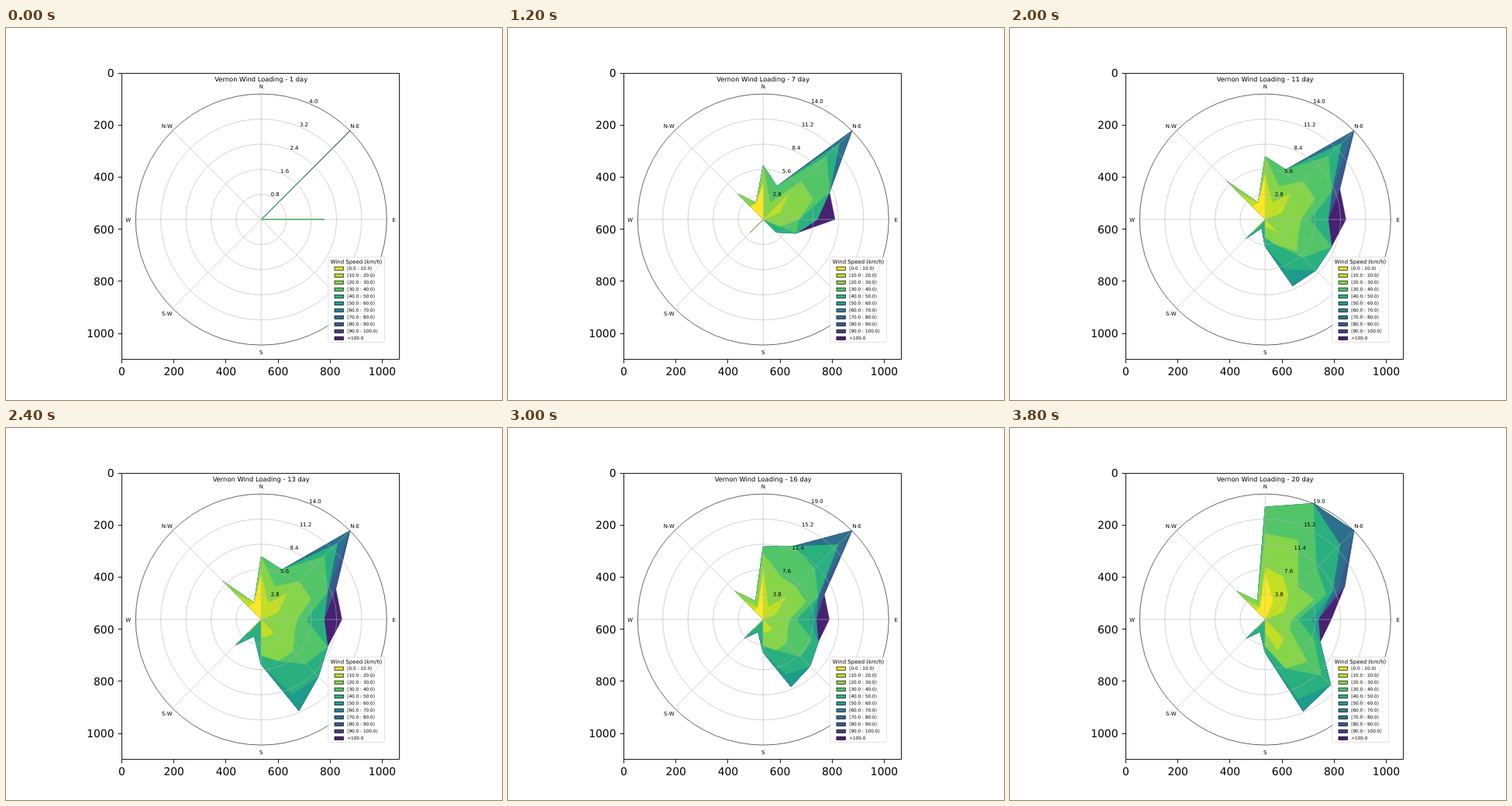
Recreate the animation shown at these times as an HTML page. Size 640 by 480 pixels, loop 4 s.

```html
<!DOCTYPE html>
<html lang="en">
<head>
<meta charset="utf-8">
<title>Vernon Wind Loading</title>
<style>
  html, body { margin: 0; width: 100%; height: 100%; overflow: hidden; background: #fff; }
  svg { display: block; width: 640px; height: 480px; }
  text { font-family: "DejaVu Sans", Verdana, sans-serif; font-size: 6.94px; text-rendering: geometricPrecision; }
  .axis text { font-size: 13.89px; }
  .axis path { fill: none; stroke: #000; stroke-width: .9; }
  .grid { fill: none; stroke: #b0b0b0; stroke-width: .56; }
  .rim { fill: none; stroke: #000; stroke-width: .6; }
  .mid { text-anchor: middle; }
  .end { text-anchor: end; }
  .title { font-size: 8.33px; text-anchor: middle; }
  .legend text { font-size: 5.78px; }
  .legend .head { font-size: 6.94px; text-anchor: middle; }
  polygon { stroke-width: .5; stroke-linejoin: bevel; }
</style>
</head>
<body>
<svg id="stage" viewBox="0 0 640 480"></svg>
<script>
const CX = 329.3, CY = 247.1, R = 162, DAYS = 20, STEP = 200;
const DIRS = ['N', 'NNE', 'NE', 'ENE', 'E', 'ESE', 'SE', 'SSE',
              'S', 'SSW', 'SW', 'WSW', 'W', 'WNW', 'NW', 'NNW'];
const COLORS = ['#fde725', '#c2df23', '#86d549', '#52c569', '#2ab07f', '#1e9b8a',
                '#25858e', '#2d708e', '#38598c', '#433e85', '#482173'];

// Readings gained up to each day: direction, then speed bin + count.
const LOG = {
  1: 'NE 4+2 7+2, E 2+2',
  4: 'N 0+2 2+2, NNE 2+2 3+2, NE 1+2 2+2 3+4, ENE 2+4, E 10+2, SE 4+2, NW 2+2',
  7: 'N 0+2, NE 1+2, ENE 1+2 3+2, E 2+2 4+2, ESE 2+2 3+2, SW 1+2, NW 0+2, NNW 0+2',
  9: 'NNE 1+2, ESE 2+2 3+2, SE 1+2 2+2, SSE 4+2 5+2, NW 1+2',
  13: 'N 0+1, ENE 8+1, E 3+1, SE 2+1 3+2, SSE 1+2 2+3 4+2, S 1+2 2+2 4+1, SSW 4+2, SW 4+2',
  16: 'N 0+2 1+1 3+1, NNE 2+3 3+3, NE 1+1 4+3 7+1, ENE 2+1, E 5+1, ESE 4+1, SE 3+1, NNW 2+1',
  20: 'N 2+3 3+3, NNE 0+3 1+2 2+1 3+1, ENE 1+1 4+1 7+1, SE 1+2 2+2, SSE 1+3 4+1'
};

const stage = document.getElementById('stage');

function add(parent, tag, attrs = {}, label) {
  const el = document.createElementNS('http://www.w3.org/2000/svg', tag);
  for (const key in attrs) el.setAttribute(key, attrs[key]);
  if (label !== undefined) el.textContent = label;
  return parent.appendChild(el);
}
const group = name => add(stage, 'g', { class: name });

function polar(r, deg) {
  const a = deg * Math.PI / 180;
  return [CX + r * Math.sin(a), CY - r * Math.cos(a)];
}

// Cumulative counts per speed bin and direction on a given day.
function totals(day) {
  const bins = COLORS.map(() => DIRS.map(() => 0));
  let prev = 0;
  for (const key of Object.keys(LOG).map(Number)) {
    const share = Math.min(1, Math.max(0, (day - prev) / (key - prev)));
    for (const entry of LOG[key].split(', ')) {
      const [dir, ...gains] = entry.split(' ');
      for (const gain of gains) {
        const [bin, count] = gain.split('+').map(Number);
        bins[bin][DIRS.indexOf(dir)] += Math.round(count * share);
      }
    }
    prev = key;
  }
  for (let b = 1; b < bins.length; b++) {
    bins[b] = bins[b].map((n, i) => n + bins[b - 1][i]);
  }
  return bins;
}

// Highest bin lies at the back.
const petals = group('petals');
const layers = COLORS.map(c => c).reverse()
  .map(c => add(petals, 'polygon', { fill: c, stroke: c })).reverse();

const grid = group('grid');
for (let k = 1; k < 5; k++) add(grid, 'circle', { cx: CX, cy: CY, r: R * k / 5 });
for (let a = 0; a < 360; a += 45) {
  const [x, y] = polar(R, a);
  add(grid, 'path', { d: `M${CX} ${CY}L${x} ${y}` });
}
add(stage, 'circle', { class: 'rim', cx: CX, cy: CY, r: R });

const title = add(stage, 'text', { class: 'title', x: 329.2, y: 68.8 });
for (const [name, x, y] of [['N', 329.3, 78.4], ['N-E', 450.2, 128.9], ['E', 500.6, 249.6],
                            ['S', 329.3, 421.4], ['S-W', 207.8, 371.3], ['W', 157.7, 249.6],
                            ['N-W', 207.8, 128.9]]) {
  add(stage, 'text', { class: 'mid', x, y }, name);
}
const rings = [1, 2, 3, 4, 5].map(k => {
  const [x, y] = polar(R * k / 5, 22.5);
  return add(stage, 'text', { x, y: y - .2 });
});

const legend = group('legend');
add(legend, 'rect', { x: 415.7, y: 295.6, width: 72.8, height: 109.8, rx: 1.4,
  fill: '#fff', 'fill-opacity': .8, stroke: '#ccc', 'stroke-opacity': .8, 'stroke-width': .7 });
add(legend, 'text', { class: 'head', x: 452, y: 303.6 }, 'Wind Speed (km/h)');
COLORS.forEach((fill, i) => {
  const y = 310.3 + 9 * i;
  add(legend, 'rect', { x: 424, y: y - 2.1, width: 11.5, height: 4.2, fill, stroke: '#000', 'stroke-width': .7 });
  const range = i < 10 ? `[${(i * 10).toFixed(1)} : ${(i * 10 + 10).toFixed(1)})` : '>100.0';
  add(legend, 'text', { x: 440.2, y: y + 2.1 }, range);
});

const axis = group('axis');
add(axis, 'path', { d: 'M149.5 58.5H507.5V427.5H149.5Z' });
for (let v = 0; v <= 1000; v += 200) {
  const x = 149 + .336 * v, y = 57.6 + .336 * v;
  add(axis, 'path', { d: `M${Math.round(x) + .5} 427.5v5M149.5 ${Math.round(y) + .5}h-5` });
  add(axis, 'text', { class: 'mid', x: x + .5, y: 447.9 }, v);
  add(axis, 'text', { class: 'end', x: 139.5, y: y + 5.4 }, v);
}

function show(day) {
  const bins = totals(day);
  const max = Math.max(...bins[bins.length - 1]);
  bins.forEach((counts, b) => {
    const points = counts.map((n, i) => polar(R * n / max, i * 22.5).map(v => v.toFixed(2)).join());
    layers[b].setAttribute('points', counts.some(n => n) ? points.join(' ') : '');
  });
  rings.forEach((el, i) => { el.textContent = (max * (i + 1) / 5).toFixed(1); });
  title.textContent = `Vernon Wind Loading - ${day} day`;
}

let shown = 0;
function tick() {
  const day = Math.floor(performance.now() / STEP) % DAYS + 1;
  if (day !== shown) show(shown = day);
  requestAnimationFrame(tick);
}
tick();
</script>
</body>
</html>
```
